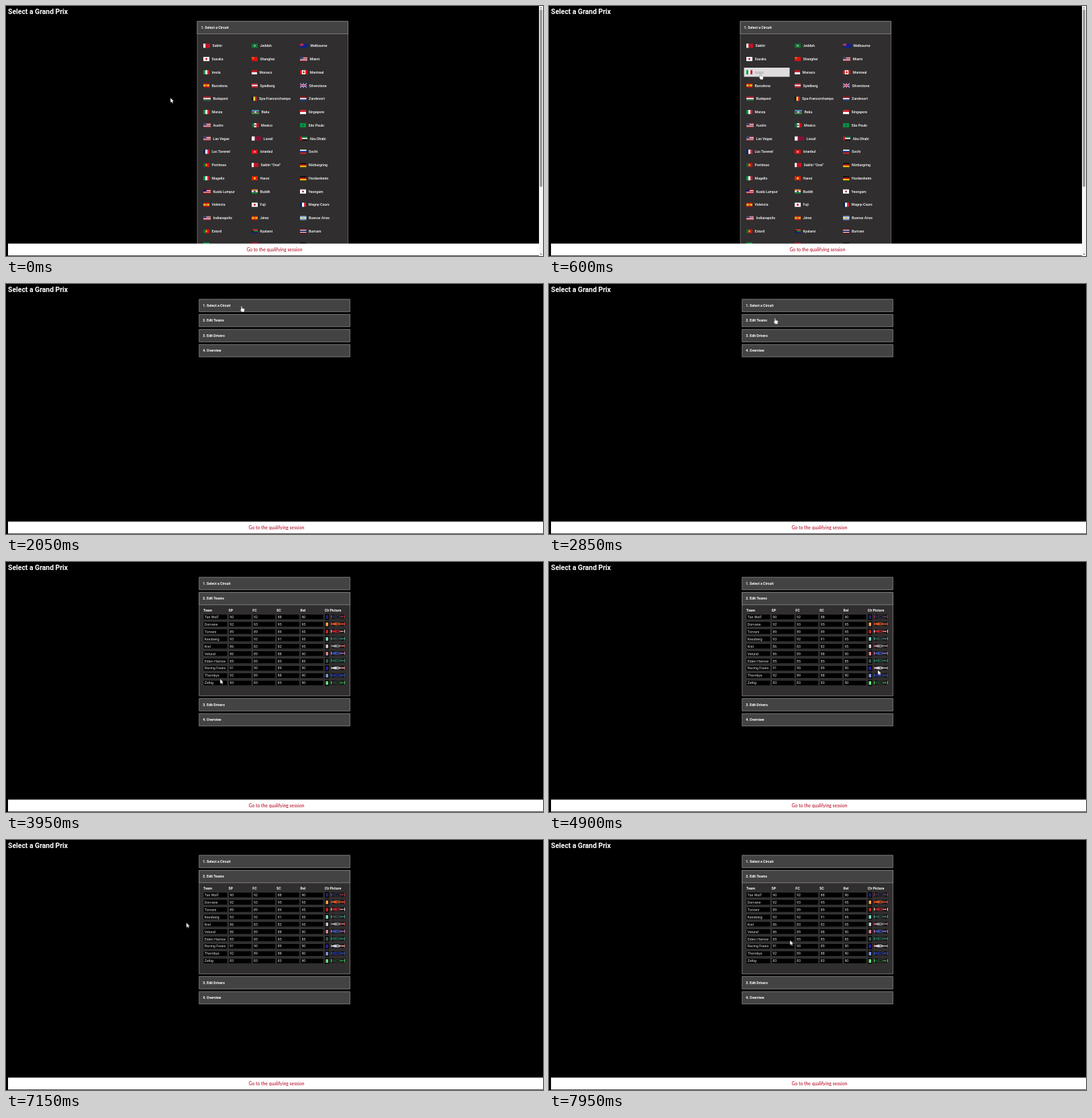
Recreate the animation shown at these times as an HTML page. Size 800 by 373 pixels, loop 8000 ms.

```html
<!DOCTYPE html>
<html lang="en">
<head>
<meta charset="utf-8">
<title>Select a Grand Prix</title>
<style>
html, body { margin: 0; width: 100%; height: 100%; overflow: hidden; background: #000; }
svg { display: block; width: 100vw; height: 100vh; }
text { font: 500 5.2px Roboto, sans-serif; fill: #fff; }
.title { font-size: 10.4px; }
.bold { font-weight: 700; }
.cell { font-weight: 400; letter-spacing: .05px; fill: #e8e8e8; }
.go { font: 500 6.8px Lato, sans-serif; fill: #b5122b; text-anchor: middle; }
.dim { fill: #a6a6a6; }

#circuits, #menu, #teams, #pick, .arrow, .hand { animation: 8s step-end infinite; }
#circuits { animation-name: circuits; }
#menu { animation-name: menu; }
#teams { animation-name: teams; }
#pick { animation-name: pick; }
.hand { animation-name: hand; }
.arrow { animation-name: arrow; }
#cursor { animation: move 8s linear infinite; }

@keyframes circuits { 0% { visibility: visible } 25.625%, 100% { visibility: hidden } }
@keyframes menu { 0% { visibility: hidden } 25.625% { visibility: visible } 41.875%, 100% { visibility: hidden } }
@keyframes teams { 0% { visibility: hidden } 41.875%, 100% { visibility: visible } }
@keyframes pick { 0% { visibility: hidden } 4.375% { visibility: visible } 25.625%, 100% { visibility: hidden } }
@keyframes hand { 0% { visibility: hidden } 4.375% { visibility: visible } 43.125%, 100% { visibility: hidden } }
@keyframes arrow { 0% { visibility: visible } 4.375% { visibility: hidden } 43.125%, 100% { visibility: visible } }
@keyframes move {
  0% { transform: translate(245px, 137px); animation-timing-function: ease-in-out }
  5.625%, 6.875% { transform: translate(316px, 101px) }
  7.5%, 12.5% { transform: translate(315px, 101px) }
  13.75%, 15% { transform: translate(313px, 103px) }
  18.125%, 28.75% { transform: translate(351px, 33px) }
  35.625%, 41.25% { transform: translate(336.7px, 51px) }
  46.25%, 48.125% { transform: translate(318px, 149px) }
  49.375%, 51.25% { transform: translate(319px, 174.5px) }
  54.375%, 56.875% { transform: translate(484px, 97px) }
  62% { transform: translate(491px, 172px) }
  66.875%, 68.125% { transform: translate(478px, 97px) }
  68.75%, 71.25% { transform: translate(478px, 91px) }
  71.875% { transform: translate(480.2px, 82.5px) }
  78.125%, 86.25% { transform: translate(480px, 117px) }
  89.375% { transform: translate(268.6px, 123.3px) }
  96.875% { transform: translate(302px, 148px) }
  99.375%, 100% { transform: translate(359px, 149.6px) }
}
</style>
</head>
<body>
<svg viewBox="0 0 800 373" preserveAspectRatio="none">
  <rect width="800" height="373"/>
  <text class="title bold" x="3" y="12">Select a Grand Prix</text>
  <g id="circuits"></g>
  <g id="menu"></g>
  <g id="teams"></g>
  <g id="cursor">
    <path class="arrow" d="M0 0V7.2L1.7 5.7 2.9 8.3 4 7.8 2.9 5.3H5.1Z" fill="#fff" stroke="#222" stroke-width=".3"/>
    <path class="hand" d="M-.8 .3Q0-.5.6.3V3L4 3.8Q4.5 4 4.3 5.4L3.7 8.8H.2L-2.2 5.6Q-2.2 4.6-.8 5.3Z" fill="#fff" stroke="#222" stroke-width=".3"/>
  </g>
</svg>
<script>
const NS = 'http://www.w3.org/2000/svg';

function el(parent, tag, attrs, content) {
  const node = document.createElementNS(NS, tag);
  for (const key in attrs) node.setAttribute(key, attrs[key]);
  if (content) node.textContent = content;
  return parent.appendChild(node);
}
const rect = (g, x, y, width, height, fill, more) => el(g, 'rect', { x, y, width, height, fill, ...more });
const text = (g, x, y, content, cls = '') => el(g, 'text', { x, y, class: cls }, content);
const dot = (g, cx, cy, r, fill) => el(g, 'circle', { cx, cy, r, fill });
const line = (g, d, stroke, width) => el(g, 'path', { d, stroke, 'stroke-width': width, fill: 'none' });

function footer(g, right) {
  rect(g, 3, 354.5, right - 3, 17.8, '#fff');
  text(g, 1.5 + right / 2 + (right < 800 ? 1.3 : 1.5), 366.4, 'Go to the qualifying session', 'go');
}

function bar(g, x, y, label) {
  rect(g, x + .5, y + .5, 224.5, 18.5, '#434343', { stroke: '#8a8a8a', 'stroke-width': .8 });
  text(g, x + 6, y + 11.3, label, 'bold');
}

// Flags: stripe direction, width, stripe colours, then marks
// o = disc, c = canton, l = left band, t = hoist triangle, x = crosses
const FLAGS = {
  bh: 'v10 fff c12 c12', sa: 'h9 173 173 o8b9', au: 'h12 128 cb35',
  jp: 'h9 fff oc02', cn: 'h9 d11 cd51', us: 'h11 b34 eee b34 eee b34 c347',
  it: 'v9 094 fff c23', mc: 'h8 c12 fff', ca: 'v11 d11 fff fff d11 od11',
  es: 'h9 c12 fb0 fb0 c12 oc62', at: 'h9 c23 fff c23', gb: 'h10 127 x',
  hu: 'h11 c23 fff 364', be: 'v7.5 111 fd3 d23', nl: 'h9.5 a12 fff 248',
  az: 'h11 39b 945 395 occc', sg: 'h9 d23 fff', mx: 'v10.5 064 fff c12 o963',
  br: 'h9 093 o248', qa: 'v14 fff 813 813', ae: 'h11 073 fff 111 lc12',
  fr: 'v9 026 fff d23', tr: 'h9 d11 oe99', ru: 'h9.5 fff 03a d21',
  pt: 'v9 063 c11 c11 oca1', de: 'h9.5 111 c11 fc0', vn: 'h9 d21 ofe0',
  my: 'h11 c01 fff c01 fff c01 c116', in: 'h9 f93 fff 183 o448',
  kr: 'h9 fff oa35', ar: 'h9.5 7ad fff 7ad oeb4', za: 'h9 c32 174 127 t222',
  th: 'h9.5 a12 fff 226 226 fff a12', ma: 'h9 a12', xx: 'h9 111'
};

function flag(g, x, y, code) {
  const [head, ...parts] = FLAGS[code].split(' ');
  const w = +head.slice(1), h = 6.2;
  const stripes = parts.filter(p => /^[0-9a-f]{3}$/.test(p));
  const n = stripes.length;
  stripes.forEach((c, i) => head[0] === 'h'
    ? rect(g, x, y + i * h / n, w, h / n, '#' + c)
    : rect(g, x + i * w / n, y, w / n, h, '#' + c));
  for (const p of parts.slice(n)) {
    const c = '#' + p.slice(1);
    if (p[0] === 'o') dot(g, x + w / 2, y + h / 2, 1.5, c);
    if (p[0] === 'c') rect(g, x, y, w * .42, h * .5, c);
    if (p[0] === 'l') rect(g, x, y, w * .27, h, c);
    if (p[0] === 't') el(g, 'path', { d: `M${x} ${y}l4 ${h / 2}l-4 ${h / 2}z`, fill: c });
    if (p[0] === 'x') {
      line(g, `M${x} ${y}l${w} ${h}m0 ${-h}l${-w} ${h}`, '#dde', 1);
      const cross = `M${x + w / 2} ${y}v${h}M${x} ${y + h / 2}h${w}`;
      line(g, cross, '#fff', 1.8);
      line(g, cross, '#c12', 1);
    }
  }
  return w;
}

const ROWS = `bh Sakhir|sa Jeddah|au Melbourne
jp Suzuka|cn Shanghai|us Miami
it Imola|mc Monaco|ca Montreal
es Barcelona|at Spielberg|gb Silverstone
hu Budapest|be Spa-Francorchamps|nl Zandvoort
it Monza|az Baku|sg Singapore
us Austin|mx Mexico|br São Paulo
us Las Vegas|qa Losail|ae Abu Dhabi
fr Luc Tavenel|tr Istanbul|ru Sochi
pt Portimao|bh Sakhir "Oval"|de Nürburgring
it Mugello|vn Hanoi|de Hockenheim
my Kuala Lumpur|in Buddh|kr Yeongam
es Valencia|jp Fuji|fr Magny-Cours
us Indianapolis|es Jérez|ar Buenos Aires
pt Estoril|za Kyalami|th Buriram
br |ma |xx `;

function entry(g, item, col, row, cls) {
  const x = 294 + col * 72, y = 59.3 + row * 19.77;
  const w = flag(g, x, y - 3.1, item.slice(0, 2));
  text(g, x + w + 3.6, y + 1.9, item.slice(3), cls);
}

function buildCircuits(g) {
  rect(g, 285, 23, 224.5, 345, '#302e2f', { stroke: '#777', 'stroke-width': .8 });
  bar(g, 284.5, 22.5, '1. Select a Circuit');
  ROWS.split('\n').forEach((row, r) =>
    row.split('|').forEach((item, c) => entry(g, item, c, r)));
  const pick = el(g, 'g', { id: 'pick' });
  rect(pick, 290.5, 92, 68, 13.6, '#dedcdd');
  entry(pick, 'it Imola', 0, 2, 'dim');
  footer(g, 794);
  rect(g, 794, 0, 6, 373, '#f5f5f5');
  rect(g, 795.3, 5, 3.4, 265, '#929292', { rx: 1.7 });
  el(g, 'path', { d: 'M795.5 3.5L797 1.2 798.5 3.5ZM795.5 369.5L797 371.8 798.5 369.5Z', fill: '#777' });
}

function buildMenu(g) {
  ['1. Select a Circuit', '2. Edit Teams', '3. Edit Drivers', '4. Overview']
    .forEach((label, i) => bar(g, 287.3, 22.3 + i * 22.5, label));
  footer(g, 800);
}

// name, ratings, swatch, car body, car accent
const TEAMS = `Tan Wolf,90,92,88,90,#23236e,#23243f,#b33
Dorvane,92,93,95,95,#f2a54c,#d8571f,#e33
Torvani,89,89,89,95,#c3271f,#b51f2a,#ddd
Kessberg,93,92,91,95,#7ad8bd,#2f4744,#4a9
Krel,86,83,82,95,#c6c6cc,#99999d,#c33
Velund,86,89,88,90,#de8397,#3b4fae,#d7a
Elden Harrow,85,85,85,85,#2f5d4b,#1e5a47,#396
Racing Foxes,91,90,89,90,#27229c,#d5d5dc,#c66
Thornbys,92,89,88,90,#7b93d6,#1c2b8a,#35b
Zeltig,83,83,83,90,#66e07c,#1d3b25,#4d5`;

function car(g, x, y, body, trim) {
  rect(g, x, y - 3.6, 23, 7.2, '#242323');
  for (const dx of [3, 17]) for (const dy of [-3, 1.6]) rect(g, x + dx, y + dy, 3, 1.4, '#0b0b0b');
  line(g, `M${x + 4.5} ${y - 2}v4M${x + 18.5} ${y - 2}v4`, '#777', .4);
  rect(g, x + 1, y - 2, 1.3, 4, trim);
  el(g, 'path', {
    d: `M${x + 2} ${y - .6}L${x + 7} ${y - 1.9}H${x + 12}L${x + 15} ${y - .7}H${x + 22}V${y + .7}H${x + 15}L${x + 12} ${y + 1.9}H${x + 7}L${x + 2} ${y + .6}Z`,
    fill: body
  });
  rect(g, x + 9.5, y - .6, 3, 1.2, '#111');
  rect(g, x + 14.5, y - .4, 5, .8, trim);
  rect(g, x + 21, y - 2.3, 1, 4.6, trim);
}

function buildTeams(g) {
  rect(g, 287.8, 45.3, 224.5, 154.5, '#302e2f', { stroke: '#8a8a8a', 'stroke-width': .8 });
  bar(g, 287.3, 22.3, '1. Select a Circuit');
  bar(g, 287.3, 44.8, '2. Edit Teams');
  bar(g, 287.3, 203.2, '3. Edit Drivers');
  bar(g, 287.3, 225.7, '4. Overview');
  const cols = [294, 331.5, 367.3, 403, 438.6, 474.8, 482.5];
  ['Team', 'SP', 'FC', 'SC', 'Rel', 'Clr', 'Picture'].forEach((h, i) => text(g, cols[i], 74.3, h, 'bold'));
  TEAMS.split('\n').forEach((row, r) => {
    const v = row.split(','), y = 82 + r * 10.95;
    for (let i = 0; i < 5; i++) {
      rect(g, cols[i], y - 4, i ? 34.5 : 36, 8, '#000', { stroke: '#5a5a5a', 'stroke-width': .4 });
      text(g, cols[i] + 1.8, y + 1.8, v[i], 'cell');
    }
    rect(g, 475, y - 4.3, 6.4, 8.6, '#050505');
    rect(g, 476.4, y - 2.7, 3.6, 5.4, v[5]);
    car(g, 483, y - .5, v[6], v[7]);
  });
  footer(g, 800);
}

const part = id => document.getElementById(id);
buildCircuits(part('circuits'));
buildMenu(part('menu'));
buildTeams(part('teams'));
</script>
</body>
</html>
```
